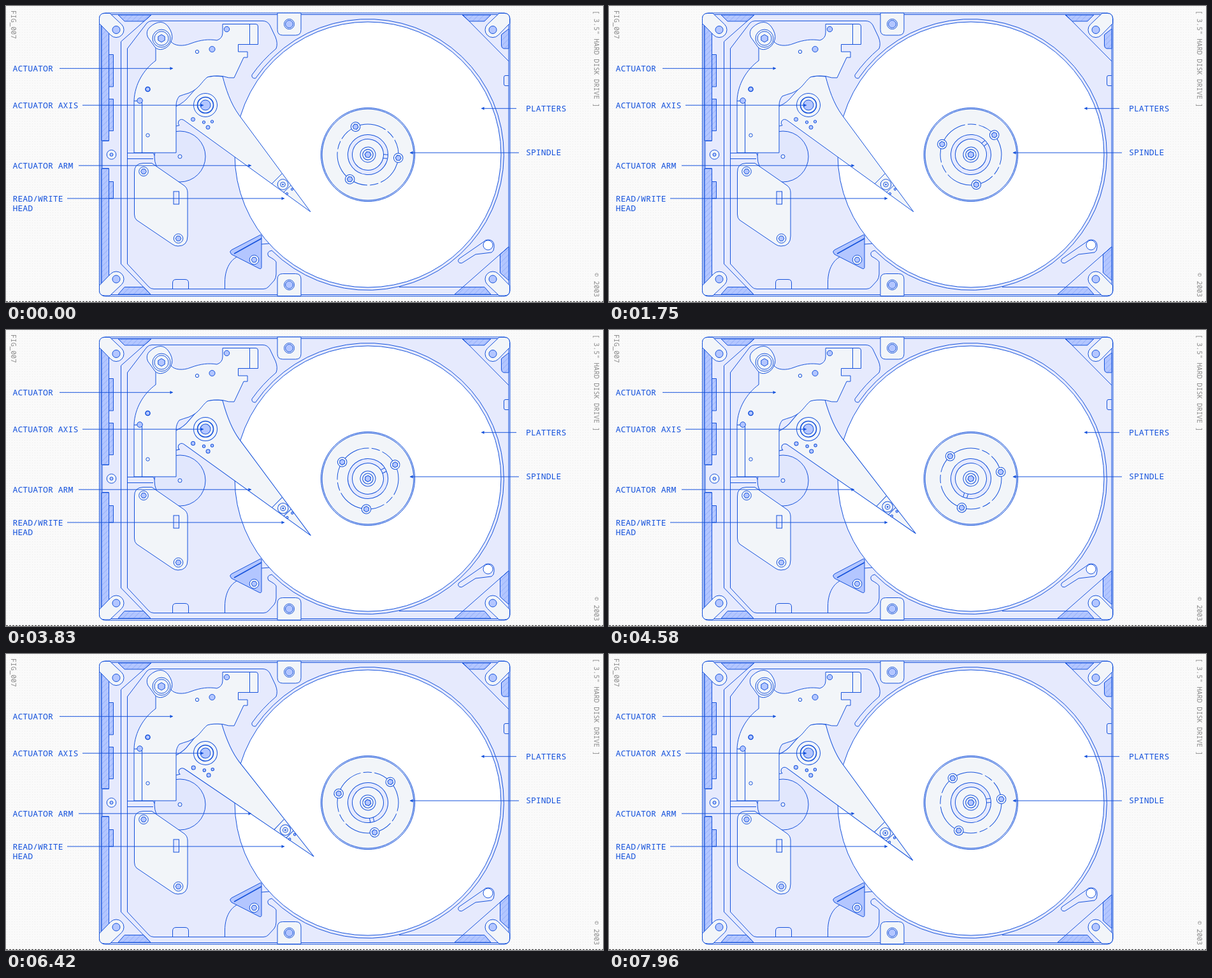
Write an HTML page that moves like this. It is 937 by 466 pixels and loops after 8000 ms.

```html
<!DOCTYPE html>
<html lang="en">
<head>
<meta charset="utf-8">
<title>Hard disk drive</title>
<style>
  html, body { margin: 0; width: 100%; height: 100%; overflow: hidden; background: #fafafa; }
  svg { display: block; width: 100vw; height: 100vh; }
  .line, .body, .pale, .dark, .hatch, .white { stroke: #1552dc; stroke-width: 1; }
  .line { fill: none; }
  .body { fill: #e6eafd; }
  .pale { fill: #f2f5f9; }
  .dark { fill: #b3c6ff; }
  .white { fill: #fff; }
  .hatch { fill: url(#stripes); }
  .bold { stroke-width: 1.6; }
  text { font-family: "Noto Sans Mono", "Liberation Mono", monospace; white-space: pre; }
  .label { font-size: 13.2px; fill: #1552dc; }
  .note { font-size: 10.6px; fill: #8b8b8b; }
</style>
</head>
<body>
<svg viewBox="0 0 937 466">
  <defs>
    <pattern id="dots" width="4" height="4" patternUnits="userSpaceOnUse">
      <rect width="4" height="4" fill="#fafafa"/>
      <rect x="1" y="1" width="1" height="1" fill="#ececec"/>
    </pattern>
    <pattern id="stripes" width="6" height="6" patternUnits="userSpaceOnUse" patternTransform="rotate(45)">
      <rect width="6" height="6" fill="#b3c6ff"/>
      <path d="M.5 0V6" stroke="#94aff8" stroke-width=".8"/>
    </pattern>
    <g id="screw">
      <circle class="pale" r="7.3"/>
      <path class="dark" d="M4.4 0L2.2 3.8H-2.2L-4.4 0L-2.2-3.8H2.2Z"/>
    </g>
    <g id="corner">
      <path class="pale" d="M-26.500-10V-18Q-26.500-26-18-26H-10L8.500-8.500A12 12 0 0 1-8.500 8.500Z"/>
      <circle class="dark" r="6"/>
    </g>
    <g id="tab">
      <path class="pale" d="M-18.500-17.500V9Q-18.500 17.500-10 17.500H10Q18.500 17.500 18.500 9V-17.500Z"/>
      <circle class="pale" r="8"/>
      <circle class="dark" r="6"/>
    </g>
  </defs>

  <rect width="937" height="466" fill="url(#dots)"/>
  <path d="M0 465.300H937" stroke="#222" stroke-dasharray="3 2"/>

  <!-- Case -->
  <rect class="body" x="146.500" y="11" width="644.500" height="446" rx="9"/>
  <rect class="line" x="149" y="13.500" width="640" height="441" rx="7"/>
  <g class="hatch">
    <path d="M150 28H161.500V212H150ZM150 256H161.500V440H150Z"/>
    <path d="M161.500 76.500H168.500V127H161.500ZM161.500 146.500H168.500V196.500H161.500ZM161.500 276.500H168.500V303H161.500Z"/>
    <path d="M176 14H228L217 24H186ZM186 442.500H216L227 454H176Z"/>
    <path d="M716 14H761L751 24H727ZM777.500 45L789 36V67H781Q777.500 66 777.500 62Z"/>
    <path d="M775.500 391L789 379V432L775.500 420ZM717 442.500H751L761 454H704Z"/>
  </g>
  <path class="body" d="M161.500 212.500H151V255.500H161.500"/>
  <path class="line" d="M228 14L180.500 56V406L227 454M717 14L789 87M789 379L717 442.500H617M789 109.500H784Q781.500 109.500 781.500 112V123Q781.500 125.500 784 125.500H789"/>
  <circle class="pale" cx="165.500" cy="234" r="7.300"/>
  <circle class="dark" cx="165.500" cy="234" r="2.500"/>
  <use href="#corner" transform="translate(173 37.500)"/>
  <use href="#corner" transform="translate(764 37.500) scale(-1 1)"/>
  <use href="#corner" transform="translate(173 430) scale(1 -1)"/>
  <use href="#corner" transform="translate(764 430) scale(-1 -1)"/>

  <!-- Recess and platter -->
  <path class="line" d="M391.500 114Q385 114 386 108.500A221 221 0 0 1 424 67Q427 59 423 49L414 30Q410 23.500 403 23.500H229Q224 23.500 221 27L190.500 67V406L224 442Q227 445.500 232 445.500H404Q409 445.500 412 442L421 432Q424 428 424 422V403Q423 400 412 394Q408 387 417.100 384.900"/>
  <path class="line" d="M391.500 114A213.400 213.400 0 1 1 417.100 384.900"/>
  <circle class="white" cx="568" cy="234" r="209"/>
  <use href="#tab" transform="translate(444.500 28.500)"/>
  <use href="#tab" transform="translate(444.500 439) scale(1 -1)"/>
  <path class="line" d="M750 371L711 398Q708 402 712 404.500Q715 406 719 402.500L737 391L762 388Q766 386 766 380V376Q765 368 756.500 368Q752 368 750 371Z"/>
  <circle class="white" cx="756.500" cy="376.500" r="7.500"/>

  <!-- Lower left parts -->
  <path class="line" d="M190 231.500H231L238 244M190 240.500H231M261.500 445V436Q261.500 430.500 267 430.500H281Q286.500 430.500 286.500 436V445M343.500 445V435C343.500 410 356 393 373 392M401 375L413 374"/>
  <circle cx="273" cy="237" r="40" class="line" style="fill:#e1e7fd"/>
  <circle class="pale" cx="273" cy="237" r="3"/>
  <path class="pale" d="M201.500 262Q201 248 215 247.500H229L280 283Q285 287 285 294V362Q285 378 270 378Q265 378 261 375L205 337Q201.500 334 201.500 328Z"/>
  <rect class="body" x="263" y="292" width="8.500" height="20"/>
  <path class="dark" d="M352 388Q351 386 354 384L398 361Q401 359 401 362V411Q401 415 397 413L354 391Z"/>
  <path class="line bold" d="M358 390L401 366"/>
  <use href="#screw" x="216" y="260.500"/>
  <use href="#screw" x="270.500" y="366"/>
  <use href="#screw" x="389.500" y="399.500"/>

  <!-- Spindle -->
  <g transform="translate(568 234)">
    <circle class="pale" r="73.700"/>
    <circle class="line" r="71.900"/>
    <g id="spindle">
      <g id="hubParts"></g>
      <circle class="body" r="31.500"/>
      <path class="line" d="M24-3H31M24 3H31"/>
      <circle class="pale" r="24.500"/>
      <circle class="pale" r="12"/>
      <use href="#screw" transform="scale(1.12)"/>
    </g>
  </g>

  <!-- Arm -->
  <g id="arm">
    <path class="pale" d="M314 112Q327 109 340 111C345 130 352 153 366 172L478 324L281 181Q275 176 271 181Q269 185 272 188L262 190V160Q275 155 283 147Z"/>
    <path class="line" d="M417 280L433 264M447 282.500L435.500 293.500"/>
    <circle class="pale" cx="434.500" cy="281" r="8.300"/>
    <circle class="line" cx="434.500" cy="281" r="3.800"/>
    <g class="dark">
      <circle cx="434.500" cy="281" r="1"/>
      <circle cx="449" cy="288.500" r="1.700"/>
      <circle cx="441" cy="295.500" r="1.700"/>
      <circle cx="293.500" cy="178.500" r="3"/>
      <circle cx="310.500" cy="183" r="2.200"/>
      <circle cx="323.500" cy="182" r="2.200"/>
      <circle cx="317" cy="191" r="3"/>
    </g>
    <circle class="pale" cx="313" cy="156" r="18.500"/>
    <circle class="pale bold" cx="313" cy="156" r="12.500"/>
    <circle class="dark" cx="313" cy="156" r="8"/>
  </g>

  <!-- Actuator -->
  <path class="pale" d="M235 60L259 56C264 63 278 64 290 59C306 53 318 52 331 54Q340 51 340 42V28.500H392Q395.500 28.500 395.500 32V60.500H364.500V72H379V81H373L358 113Q350 114 340 110.500Q325 109 316 112C306 120 304 130 287 137Q277 140 272 142Q267 148 267 157V231H201V149C202 123 216 100 235 86Z"/>
  <path class="line" d="M201 149.500H213.500V231M382.500 28.500V60"/>
  <path class="pale" d="M222.500 49Q219 40 225 34Q234 25.500 243 25.500Q250 26 255 33Q262 43 260.500 52Q257 65 246 68Q239 70 234 65Z"/>
  <g transform="translate(244 51)">
    <circle class="pale" r="14"/>
    <circle class="pale" r="11"/>
    <path class="dark" d="M0-6L5.200-3V3L0 6L-5.200 3V-3Z"/>
  </g>
  <g class="dark">
    <circle cx="346.500" cy="36.500" r="4.200"/>
    <circle cx="323.500" cy="68" r="4.500"/>
    <circle class="bold" cx="222.500" cy="131" r="3.500"/>
    <circle cx="210" cy="149" r="4.300"/>
  </g>
  <circle class="pale" cx="300" cy="72" r="2.700"/>
  <circle class="pale" cx="222.500" cy="203.500" r="2.700"/>

  <g id="labels"></g>
  <text class="note" transform="translate(7.500 7) rotate(90)">FIG_007</text>
  <text class="note" transform="translate(922.500 7) rotate(90)">[ 3.5" HARD DISK DRIVE ]</text>
  <text class="note" transform="translate(922.500 420) rotate(90)">© 2003</text>
</svg>
<script>
  const byId = id => document.getElementById(id);

  // text, text x, baseline, leader y, leader start, leader tip
  const labels = [
    ["ACTUATOR", 10.5, 103, 98.3, 84, 262],
    ["ACTUATOR AXIS", 10.5, 161, 156.2, 120, 310],
    ["ACTUATOR ARM", 10.5, 256, 251.2, 114, 385],
    ["READ/WRITE", 10.5, 308, 303, 96, 437],
    ["HEAD", 10.5, 323],
    ["PLATTERS", 816, 166, 161.3, 801, 746],
    ["SPINDLE", 816, 235, 231, 805, 634]
  ];
  byId("labels").innerHTML = labels.map(([text, x, base, y, from, tip]) => {
    const back = tip - Math.sign(tip - from) * 4.5;
    const leader = y ? `<path class="line" d="M${from} ${y}H${tip}"/>
      <path fill="#1552dc" d="M${tip} ${y}L${back} ${y - 2.5}V${y + 2.5}Z"/>` : "";
    return `${leader}<text class="label" x="${x}" y="${base}">${text}</text>`;
  }).join("");

  // Three identical sectors: a broken ring and a screw
  const polar = deg => {
    const a = deg * Math.PI / 180;
    return `${48 * Math.cos(a)} ${48 * Math.sin(a)}`;
  };
  const arc = (from, to) => `M${polar(from)}A48 48 0 0 1 ${polar(to)}`;
  byId("hubParts").innerHTML = [0, 120, 240].map(turn => `<g transform="rotate(${turn})">
    <path class="line" d="${arc(0, 59)}${arc(64, 80)}${arc(85, 120)}"/></g>`).join("") +
    [0, 120, 240].map(turn => `<use href="#screw" transform="rotate(${turn}) translate(48 0)"/>`).join("");

  const LOOP = 8000;
  const swing = [[0, 0], [3600, 0], [4700, -1.25], [5600, 0], [5750, 0], [6800, -2.5], [7960, .35], [LOOP, .35]];

  function armAngle(t) {
    const i = swing.findIndex(([time]) => time > t);
    const [t0, a0] = swing[i - 1], [t1, a1] = swing[i];
    const ease = (1 - Math.cos(Math.PI * (t - t0) / (t1 - t0))) / 2;
    return a0 + (a1 - a0) * ease;
  }

  function draw(now) {
    const t = now % LOOP;
    byId("spindle").setAttribute("transform", `rotate(${6 + t * .1793})`);
    byId("arm").setAttribute("transform", `rotate(${armAngle(t)} 313 156)`);
  }

  const start = performance.now();
  function tick() {
    draw(Math.max(0, performance.now() - start));
    requestAnimationFrame(tick);
  }
  tick();
</script>
</body>
</html>
```
